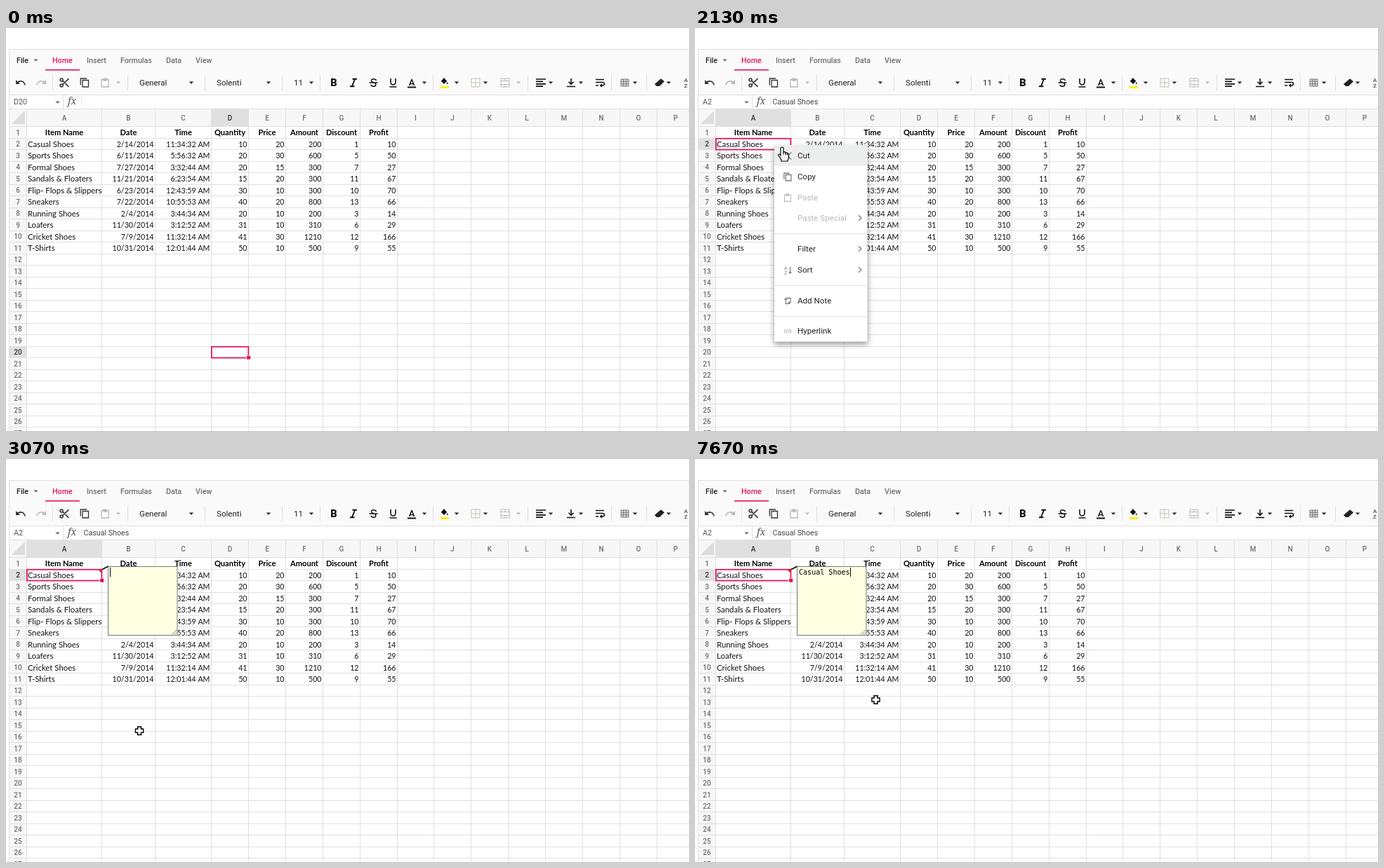
These frames come from a looping animation (973 by 575 pixels, 8000 ms). An HTML page with a canvas:

```html
<!DOCTYPE html>
<html lang="en">
<head>
<meta charset="utf-8">
<title>Adding a note to a spreadsheet cell</title>
<style>
html, body { margin: 0; width: 100%; height: 100%; overflow: hidden; background: #fff; }
canvas { display: block; }
</style>
</head>
<body>
<canvas width="973" height="575"></canvas>
<script>
const ctx = document.querySelector('canvas').getContext('2d');
const LOOP = 8000, STEP = 1000 / 15;
const PINK = '#e3165b', INK = '#212121', GRAY = '#6f6f6f', PALE = '#b9b9b9', LINE = '#e0e0e0';
const UI = '10.7px Roboto, sans-serif', UI_BOLD = '500 ' + UI;
const MENU_FONT = '11.6px Roboto, sans-serif', HEAD_FONT = '500 10px Roboto, sans-serif';
const LABEL = '11.4px Lato, sans-serif', NUMBER = '10.65px Lato, sans-serif';
const TITLE = 'bold 11.1px Lato, sans-serif';

const edges = [29, 136, 212, 292];
for (let i = 1; i < 14; i++) edges.push(Math.round(292 + 52.9 * i));
const rowTop = row => 140.75 + 16.5 * (row - 1);

const table = `Item Name|Date|Time|Quantity|Price|Amount|Discount|Profit
Casual Shoes|2/14/2014|11:34:32 AM|10|20|200|1|10
Sports Shoes|6/11/2014|5:56:32 AM|20|30|600|5|50
Formal Shoes|7/27/2014|3:32:44 AM|20|15|300|7|27
Sandals & Floaters|11/21/2014|6:23:54 AM|15|20|300|11|67
Flip- Flops & Slippers|6/23/2014|12:43:59 AM|30|10|300|10|70
Sneakers|7/22/2014|10:55:53 AM|40|20|800|13|66
Running Shoes|2/4/2014|3:44:34 AM|20|10|200|3|14
Loafers|11/30/2014|3:12:52 AM|31|10|310|6|29
Cricket Shoes|7/9/2014|11:32:14 AM|41|30|1210|12|166
T-Shirts|10/31/2014|12:01:44 AM|50|10|500|9|55`.split('\n').map(r => r.split('|'));

const ICON = {
  undo: 'M-7-4V2H-1L-3.2-.2Q3-3.5 5.6 3.8L7 3.3Q4-6-4.8-1.8Z',
  redo: 'M7-4V2H1L3.2-.2Q-3-3.5-5.6 3.8L-7 3.3Q-4-6 4.8-1.8Z',
  cut: 'M-2.4-4A2 2 0 1 1-6.4-4A2 2 0 1 1-2.4-4M-2.4 4A2 2 0 1 1-6.4 4A2 2 0 1 1-2.4 4M-3-2.8L6 5.8M-3 2.8L6-5.8',
  copy: 'M-3-3.5H5.5V6H-3ZM-5.7 3.5V-6H3',
  paste: 'M-5-4.5H5V6H-5ZM-2-5.8H2V-3H-2Z',
  strike: 'M-6 0H6M4-3Q3-5.5 0-5.3Q-3.5-5-3-2.5Q-2.5-1 0-.4M2 .8Q4 2 3 4Q2 5.5 0 5.3Q-3 5-3.6 3',
  italic: 'M-1.5-5.2H5M-5 5.2H1.5M2-5L-2 5',
  underline: 'M-3.5-6V-1Q-3.5 3 0 3Q3.5 3 3.5-1V-6M-5 6H5',
  bucket: 'M-1.5-6L-.4-7L5-1.5L0 3.5L-5-1.5L-1-5.5ZM5.5 0Q8 3.3 5.5 3.5Q3.5 3.3 5.5 0Z',
  grid: 'M-6-6H6V6H-6ZM0-6V6M-6 0H6',
  merge: 'M-6-6H6V6H-6ZM-6-2.5H6M-6 2.5H6M0-6V-2.5M0 2.5V6',
  align: 'M-7-5H7M-7-1.6H3M-7 1.8H7M-7 5.2H3',
  bottom: 'M-6 5.5H6M0-6V2M-3.5-1.2L0 2.4L3.5-1.2',
  wrap: 'M-6-4.5H6M-6-.5H4Q6.5-.5 6.5 1.6Q6.5 4 4 4H1M3 2L.8 4L3 6M-6 4H-2',
  rules: 'M-6-5H5V5H-6ZM-6-1.7H5M-6 1.7H5M-2.3-5V5M1.4-5V5',
  eraser: 'M-7 2L2-5.8L7-1.8L0 5H-4.2Z',
  note: 'M-2-4H4.5V2.5L2 5H-3V1M-5.5-2H-.5M-3-4.5V.5M2 5V2.5H4.5',
  link: 'M-1-2.3H-3A2.3 2.3 0 0 0-3 2.3H-1M1-2.3H3A2.3 2.3 0 0 1 3 2.3H1M-2.5 0H2.5',
  sort: 'M4-5V5M2.3 3L4 5L5.7 3',
  chevron: 'M-2-3.8L2 0L-2 3.8',
  hand: 'M-2 1Q-2-1 0-1Q2-1 2 1V6Q4 5 5 7Q7 6 7.5 8Q9.5 7.5 9.5 10V14Q9 16 8 18V19H-1V17Q-3 14-5 11Q-6 8.8-4 9Q-3 9.2-2 11ZM2 6V9.5M5 7V10M7.5 8V10.5',
};
for (const name in ICON) ICON[name] = new Path2D(ICON[name]);

const menuItems = [
  { label: 'Cut', y: 182, icon: 'cut' },
  { label: 'Copy', y: 212, icon: 'copy' },
  { label: 'Paste', y: 241.5, icon: 'paste', off: true },
  { label: 'Paste Special', y: 271, off: true, more: true },
  { label: 'Filter', y: 315, more: true },
  { label: 'Sort', y: 345, icon: 'sort', more: true },
  { label: 'Add Note', y: 388.5, icon: 'note' },
  { label: 'Hyperlink', y: 432, icon: 'link' },
];
const keyTimes = [4330, 4530, 4930, 5130, 5270, 5530, 6670, 7000, 7130, 7400, 7530, 7670];

function text(s, x, y, font, color = INK, align = 'left') {
  ctx.font = font; ctx.fillStyle = color; ctx.textAlign = align;
  ctx.fillText(s, x, y);
}
function rect(x, y, w, h, color) { ctx.fillStyle = color; ctx.fillRect(x, y, w, h); }
function line(x1, y1, x2, y2, color = LINE, width = 1) {
  ctx.strokeStyle = color; ctx.lineWidth = width;
  ctx.beginPath(); ctx.moveTo(x1, y1); ctx.lineTo(x2, y2); ctx.stroke();
}
function poly(color, ...p) {
  ctx.fillStyle = color; ctx.beginPath();
  for (let i = 0; i < p.length; i += 2) ctx.lineTo(p[i], p[i + 1]);
  ctx.fill();
}
function icon(name, x, y, { color = '#333', fill, width = 1.3, scale = 1 } = {}) {
  ctx.save();
  ctx.translate(x, y); ctx.scale(scale, scale);
  if (fill) { ctx.fillStyle = fill; ctx.fill(ICON[name]); }
  if (width) { ctx.strokeStyle = color; ctx.lineWidth = width; ctx.stroke(ICON[name]); }
  ctx.restore();
}
const arrow = (x, y, color = INK) => poly(color, x - 3.2, y - 1.6, x + 3.2, y - 1.6, x, y + 1.8);

function drawRibbon() {
  rect(4, 30, 969, 66, '#fafafa');
  line(4, 30.5, 973, 30.5);
  line(4.5, 30, 4.5, 575);
  text('File', 15, 50, UI_BOLD);
  arrow(42.5, 46, GRAY);
  text('Home', 66, 50, UI_BOLD, PINK);
  [['Insert', 115], ['Formulas', 163], ['Data', 228], ['View', 270]]
    .forEach(([s, x]) => text(s, x, 50, UI_BOLD, GRAY));
  rect(56, 59, 49, 1.6, PINK);

  const y = 78;
  for (const x of [66, 173, 283, 393, 447, 608, 743, 862, 912]) line(x + .5, 67, x + .5, 89);
  icon('undo', 21, y, { fill: '#333', width: 0 });
  icon('redo', 50, y, { fill: PALE, width: 0 });
  icon('cut', 83.5, y, { width: 1.6 });
  icon('copy', 112, y);
  icon('paste', 141, y, { color: PALE });
  text('General', 190, 82, MENU_FONT);
  text('Solenti', 300, 82, MENU_FONT);
  text('11', 410, 82, MENU_FONT);
  text('B', 467, 83, '900 14.5px Roboto, sans-serif', '#111', 'center');
  icon('italic', 495, y, { color: '#111', width: 1.9 });
  icon('strike', 523.5, y, { color: '#111', width: 1.5 });
  icon('underline', 551.5, y, { color: '#111', width: 1.6 });
  text('A', 578, 82, '500 13px Roboto, sans-serif', '#111', 'center');
  rect(572, 83.5, 12, 2, '#111');
  icon('bucket', 624, 77, { fill: '#111', width: 0, scale: .85 });
  rect(619, 83, 12, 3, '#ffee00');
  icon('grid', 669, y, { color: '#cbbfb5', width: 1 });
  icon('merge', 711, y, { color: PALE, width: 1 });
  icon('align', 762, y, { color: '#111', width: 1.7 });
  icon('bottom', 805, y, { color: '#111', width: 1.6 });
  icon('wrap', 846, y, { color: '#111', width: 1.5 });
  icon('rules', 882, y, { color: '#777', fill: '#ddd', width: 1 });
  icon('eraser', 931, y, { fill: '#222', width: 0 });
  text('A', 966, 77, '8px Roboto, sans-serif');
  text('Z', 966, 85, '8px Roboto, sans-serif');
  for (const x of [264, 374, 435, 596, 642, 683, 776, 819, 896, 944]) arrow(x, y);
  for (const x of [160, 730]) arrow(x, y, PALE);
}

function drawFormulaBar(address, value) {
  line(5, 95.5, 973, 95.5);
  text(address, 11, 109, UI, '#555');
  arrow(73.5, 106, GRAY);
  line(81.5, 96, 81.5, 115);
  text('fx', 88, 109, 'italic 14px "Noto Serif", serif', '#555');
  line(107.5, 100, 107.5, 111);
  text(value, 110.5, 109, UI, '#444');
}

function drawSheet(col, row) {
  rect(5, 115, 968, 25, '#f7f7f7');
  rect(5, 140, 24, 435, '#f7f7f7');
  rect(edges[col], 116, edges[col + 1] - edges[col], 24, LINE);
  rect(5, rowTop(row), 24, 16.5, LINE);
  line(5, 115.5, 973, 115.5);
  poly('#dcdcdc', 27, 118, 27, 137, 8, 137);
  edges.forEach((x, i) => {
    line(x + .5, 116, x + .5, 575);
    const active = i === col;
    text(String.fromCharCode(65 + i), i === 15 ? 954 : (x + edges[i + 1]) / 2 + .5, 131.5,
      HEAD_FONT, active ? '#333' : GRAY, 'center');
  });
  for (let r = 1; r <= 27; r++) {
    const y = Math.floor(rowTop(r)) + .5;
    line(5, y, 973, y);
    text(r, 17, rowTop(r) + 12, HEAD_FONT, r === row ? '#333' : GRAY, 'center');
  }
  table.forEach((cells, r) => cells.forEach((s, c) => {
    const y = rowTop(r + 1) + 12.3;
    if (!r) text(s, (edges[c] + edges[c + 1]) / 2 + .5, y, TITLE, '#000', 'center');
    else if (!c) text(s, 31, y, LABEL, '#111');
    else text(s, edges[c + 1] - 1.5, y, NUMBER, '#111', 'right');
  }));
  const x = edges[col], w = edges[col + 1] - x, y = rowTop(row);
  ctx.strokeStyle = PINK; ctx.lineWidth = 1.8;
  ctx.strokeRect(x + .9, y + .5, w - .5, 15.8);
  rect(x + w - 3, y + 12.5, 7, 7, '#fff');
  rect(x + w - 2, y + 13.3, 5.2, 5.2, PINK);
}

function drawMenu(alpha, pointerY, pressed) {
  ctx.save();
  ctx.globalAlpha = alpha;
  ctx.save();
  ctx.shadowColor = 'rgba(0,0,0,.42)'; ctx.shadowBlur = 8; ctx.shadowOffsetY = 3;
  rect(113, 167.5, 132.5, 280, '#fff');
  ctx.restore();
  for (const y of [293.5, 367.5, 411.5]) line(113, y, 245, y);
  for (const { label, y, icon: name, off, more } of menuItems) {
    if (!off && Math.abs(pointerY - y) < 15) rect(113, y - 14.8, 132.5, 29.6, '#eceeee');
    if (pressed && label === 'Add Note') rect(146, y - 14.8, 62, 29.6, '#d1d2d2');
    text(label, 146, y + 4, MENU_FONT, off ? PALE : '#222');
    if (name) icon(name, 132, y + .5, { color: off || name === 'link' ? PALE : '#666', width: 1.2, scale: .9 });
    if (name === 'sort') {
      text('A', 127, y, '7px Roboto, sans-serif', '#888');
      text('Z', 127, y + 6.5, '7px Roboto, sans-serif', '#888');
    }
    if (more) icon('chevron', 235, y, { color: '#777', width: 1.2 });
  }
  ctx.restore();
}

function drawNote(t) {
  poly('#f01020', 130.5, 157, 136.5, 157, 136.5, 163);
  line(137, 157.5, 146, 153, '#000', 1.4);
  rect(145, 153, 100, 99, '#ffffe1');
  ctx.strokeStyle = '#777'; ctx.lineWidth = 1;
  ctx.strokeRect(145.5, 153.5, 98.5, 98);
  line(236.5, 250.5, 243, 244, '#777', .9);
  line(240, 250.5, 243, 247.5, '#777', .9);
  const typed = keyTimes.filter(k => t >= k).length;
  text('Casual Shoes'.slice(0, typed), 148, 165, '10.05px "DejaVu Sans Mono", monospace', '#000');
  const hidden = t >= 3470 && t < 4000 || t >= 6070 && t < 6600;
  if (!hidden) rect(Math.round(148 + 6.05 * typed), 155, 1, 13, '#000');
}

function drawCross(x, y) {
  rect(x - 3.2, y - 6.5, 6.4, 13, '#000');
  rect(x - 6.3, y - 3.3, 12.6, 6.6, '#000');
  rect(x - 1.7, y - 5, 3.4, 10, '#fff');
  rect(x - 4.9, y - 1.8, 9.8, 3.6, '#fff');
}

function progress(t, from, to) { return Math.min(1, Math.max(0, (t - from) / (to - from))); }
const smooth = u => u * u * (3 - 2 * u);

function draw(time) {
  const t = time % LOOP + 5;
  const stepped = Math.floor(t / STEP) * STEP;  // the pointer moves 15 times a second
  rect(0, 0, 973, 575, '#fff');
  drawRibbon();
  const clicked = t >= 1730;
  drawFormulaBar(clicked ? 'A2' : 'D20', clicked ? 'Casual Shoes' : '');
  drawSheet(clicked ? 0 : 3, clicked ? 2 : 20);

  const handMove = smooth(progress(stepped, 2133, 2800));
  const handX = 124 + 53.5 * handMove, handY = 171 + 225 * handMove;
  if (t >= 1800 && t < 2930) drawMenu(t < 1870 ? .5 : 1, t < 2130 ? 0 : handY, t >= 2800);
  if (t >= 2930) drawNote(t);

  if (t >= 2930) {
    const u = smooth(progress(stepped, 3000, 3266));
    drawCross(177.5 + 80 * u, 396 - 52.5 * u);
  } else if (t >= 2130) {
    icon('hand', handX, handY, { color: '#000', fill: '#fff', width: 1.2 });
  } else if (t >= 600) {
    const rest = 1 - progress(stepped, 600, 1400);
    drawCross(113 + 854 * rest ** 3.3, (t < 1470 ? 168.5 : 167.5) + 400 * rest ** 4.2);
  }
}

const start = performance.now();
function tick() {
  draw(performance.now() - start);
  requestAnimationFrame(tick);
}
tick();
</script>
</body>
</html>
```
